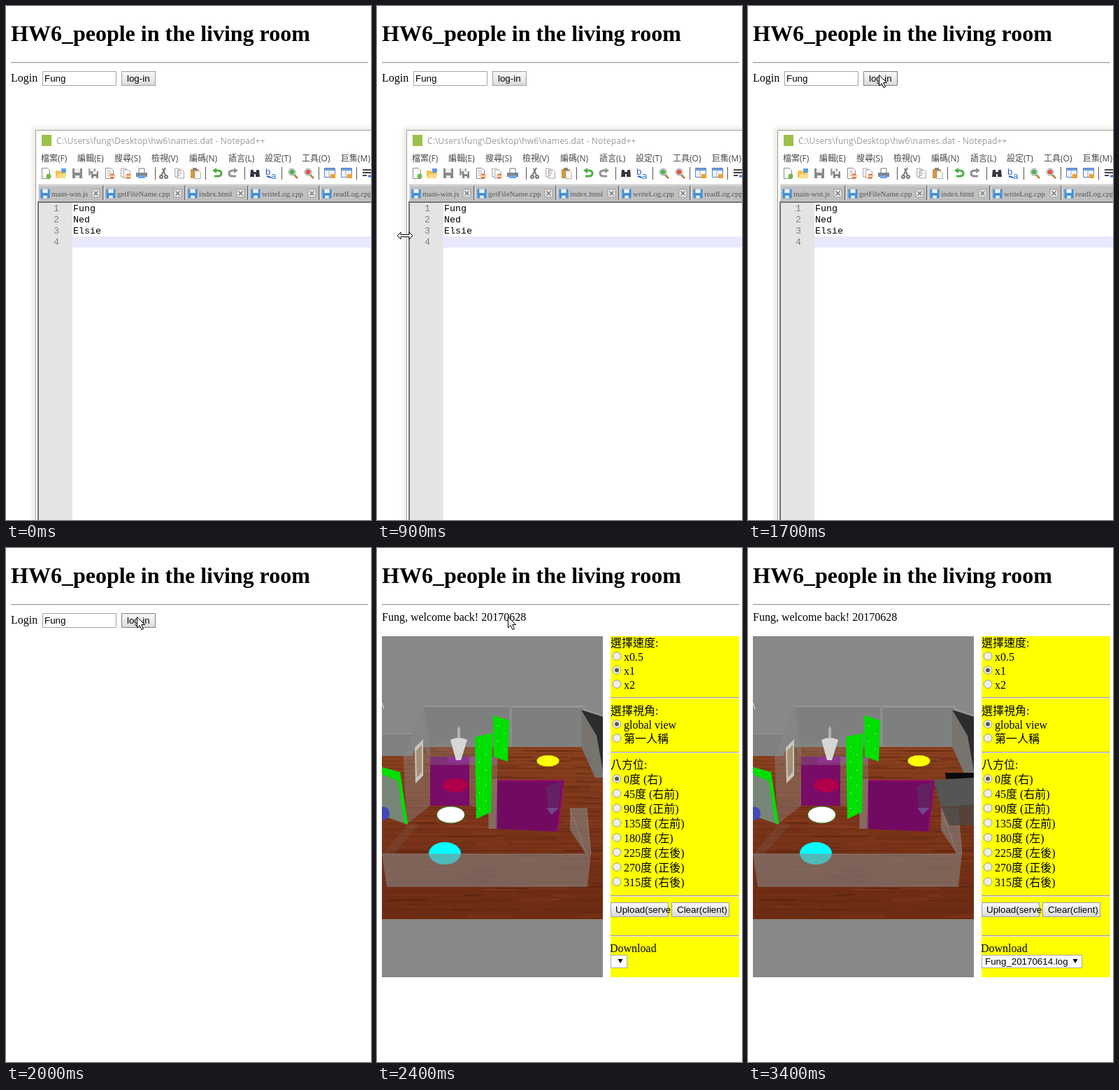
These frames come from a looping animation (522x734 px, 4 s). An HTML page:

```html
<!DOCTYPE html>
<html lang="zh-Hant">
<head>
<meta charset="utf-8">
<title>People in the living room</title>
<style>
html, body { margin: 0; width: 100%; height: 100%; overflow: hidden; background: #fff; }
svg { display: block; }
text { white-space: pre; }
.serif { font: 16px "Liberation Serif", "Noto Sans CJK TC", serif; }
.h1 { font: bold 32px "Liberation Serif", serif; }
.ui { font: 13.333px "Liberation Sans", sans-serif; }
.bar { font: 12px "Open Sans", "Noto Sans", sans-serif; letter-spacing: .15px; fill: #999; }
.menu { font: 12px "Open Sans", "Noto Sans CJK TC", sans-serif; fill: #444; }
.tab { font: 11px "Liberation Serif", serif; fill: #555; }
.code { font: 13.333px "Liberation Mono", monospace; }
.line { fill: none; stroke: #555; }
</style>
</head>
<body>
<svg width="522" height="734" viewBox="0 0 522 734">
  <defs>
    <linearGradient id="btn" x2="0" y2="1">
      <stop offset="0" stop-color="#f6f6f6"/><stop offset=".5" stop-color="#ececec"/><stop offset="1" stop-color="#d8d8d8"/>
    </linearGradient>
    <linearGradient id="wood" x2="0" y2="1">
      <stop offset="0" stop-color="#8a421f"/><stop offset=".4" stop-color="#7c3519"/><stop offset="1" stop-color="#6c2b13"/>
    </linearGradient>
    <filter id="blur"><feGaussianBlur stdDeviation="3"/></filter>
    <clipPath id="view"><path d="M7 126H323V613H7Z"/></clipPath>
    <clipPath id="floorClip"><path d="M7 297H50L56 284H293L323 328V530H7Z"/></clipPath>
    <clipPath id="upClip"><path d="M334 500H420.5V530H334Z"/></clipPath>
    <path id="page" d="M-5.5-7.5H2L5.5-4V7.5H-5.5Z" fill="#fff" stroke="#8a8a8a"/>
    <g id="disk"><path d="M-7-7H7V7H-7Z"/><path d="M-4-7H4V-1H-4Z M-3 3H3V7H-3Z" fill="#eee"/></g>
    <g id="glassIcon"><path d="M2 2L7 7" stroke="#b58b4a" stroke-width="3"/><circle cx="-1" cy="-2" r="5" fill="#dcebf5" stroke="#8fa4b5"/></g>
    <g id="win"><path d="M-7.5-7.5H7.5V5.5H-7.5Z" fill="#eef4fc" stroke="#5b83bd"/><path d="M-7-7H7V-4H-7Z" fill="#6f9bd8"/><path d="M-1-4V5" stroke="#9ab6dc"/><path d="M1 1H8V7H1Z" fill="#f0a030"/></g>
  </defs>

  <text class="h1" x="7" y="50">HW6_people in the living room</text>
  <path d="M7 80.5H518" stroke="#9a9a9a"/><path d="M7 81.5H518" stroke="#e4e4e4"/>

  <g id="login">
    <text class="serif" x="7" y="108">Login</text>
    <path d="M52.5 93.5H157.5V113.5H52.5Z" fill="#fff" stroke="#a4a4a4"/>
    <text class="ui" x="55" y="108">Fung</text>
    <path id="loginBtn" d="M165.5 93.5H213.5V113.5H165.5Z" fill="url(#btn)" stroke="#a0a0a0"/>
    <text class="ui" x="173" y="108">log-in</text>
  </g>

  <g id="editor">
    <path d="M38 174H540V750H38Z" fill="#d8d8cc" opacity=".6" filter="url(#blur)"/>
    <path d="M42.5 177.5H530V740H42.5Z" fill="#fff" stroke="#a0a0a0"/>
    <path d="M51 184H65V200H51Z" fill="#9cc04a"/>
    <text class="bar" x="72" y="197">C:\Users\fung\Desktop\hw6\names.dat - Notepad++</text>
    <g id="menu"></g>
    <g id="tools"></g>
    <path d="M46 255H522V280H46Z" fill="#b4b4b4"/>
    <g id="tabs"></g>
    <path d="M46 278H522V279H46Z" fill="#d8d8d8"/>
    <path d="M45 279H522V281H47V734H45Z" fill="#707070"/>
    <path d="M47 281H95V734H47Z" fill="#e4e4e4"/>
    <path d="M95 329H522V345H95Z" fill="#e8e8ff"/>
    <g id="code"></g>
  </g>

  <g id="home">
    <text class="serif" x="7" y="104">Fung, welcome back! 20170628</text>
    <g clip-path="url(#view)">
      <path d="M7 126H323V613H7Z" fill="#888"/>
      <path d="M7 297H50L56 284H293L323 328V530H7Z" fill="url(#wood)"/>
      <g id="planks" clip-path="url(#floorClip)"></g>
      <path d="M7 221L10 230" stroke="#eee"/>
      <path d="M7 265H62L50 297H7Z" fill="#808080"/><path d="M7 265.5H62" stroke="#969696"/>
      <path d="M67 226H189V283H56L38 300Z" fill="#7e8080"/>
      <path d="M193 226H293V283H193Z" fill="#7e8080"/>
      <path d="M67 225H189V227H66Z M193 225H296L298 228H193Z" fill="#959595"/>
      <path d="M189 225H193V284H189Z" fill="#8c8c8c"/>
      <path d="M292 231L296 228 323 238V328H312L292 284Z" fill="#77736f"/>
      <path d="M292 231L323 240V318L314 268Z" fill="#2c2c2c"/>
      <path d="M296 228L323 238V241L292 231Z" fill="#949494"/>
      <path d="M67 226L38 300 42 395 76 368V285Z" fill="#8c8c8c" opacity=".4"/>
      <path d="M54 285L66 273V325L55 336Z" fill="#cbc5bc"/>
      <path d="M56 290L64 281V320L57 328Z" fill="#a39078"/>
      <path d="M76 298H132V368H76Z" fill="#780c68"/>
      <path d="M67 284L132 270H172V310H76V298Z" fill="#8c8c8c" opacity=".3"/>
      <path d="M100 298H170V307H100Z" fill="#9a35a5" opacity=".6"/>
      <path d="M132 298H172V332L170 401H160V372L132 368Z" fill="#8c8c8c" opacity=".35"/>
      <path d="M172 332H267L258 405 170 401Z" fill="#730a62"/>
      <path d="M172 332H267L258 405" fill="none" stroke="#960f66" stroke-width="2"/>
      <path d="M241 341L264 333 259 374 246 380Z" fill="#642065"/>
      <path d="M242 371H260L250 381Z" fill="#70458c"/>
      <path d="M159 330H172V401H159Z" fill="#8c8c8c" opacity=".4"/>
      <path d="M166 239L189 246 187 305 167 298Z" fill="#00df00"/>
      <path d="M140 270L165 264 163 377 142 387Z" fill="#00df00"/>
      <g id="holes"></g>
      <path d="M115 271V258L117 254 119 258V271Z" fill="#b4b0ac"/>
      <path d="M105 274Q117 268 129 274L120 303H113Z" fill="#d8d6d4"/>
      <ellipse cx="244.500" cy="304" rx="16" ry="8" fill="#ffff00"/>
      <ellipse cx="112" cy="339" rx="18" ry="10" fill="#b0004a"/>
      <ellipse cx="105.500" cy="381" rx="20" ry="12" fill="#fff" stroke="#28701c"/>
      <path d="M7 313L33 320 44 395 7 382Z" fill="#788678"/>
      <path d="M7 313L33 320 44 394 39 393 30 333 7 323Z" fill="#00df00"/>
      <ellipse cx="9" cy="379" rx="9" ry="9.500" fill="#4248b8"/>
      <ellipse cx="97" cy="436" rx="23" ry="16" fill="#00ffff"/>
      <path d="M44 395L7 437H24L60 395Z" fill="#888" opacity=".15"/>
      <path d="M7 437H299L301 484H14Z" fill="#888" opacity=".58"/>
      <path d="M276 372H300L306 436 301 484 299 437 276 403Z" fill="#888" opacity=".58"/>
      <path d="M7 437H299L276 372H300L306 436" fill="none" stroke="#999" opacity=".5"/>
      <g id="late">
        <path d="M282 321H323V332L283 330Z" fill="#0b0b0b"/>
        <path d="M266 331L323 328V367L276 370Z" fill="#555"/>
        <path d="M276 370L323 366V396H288Z" fill="#4a4644" opacity=".8"/>
      </g>
    </g>
    <path d="M334 126H518V613H334Z" fill="#ff0"/>
    <g id="form"></g>
    <path d="M334.500 506.500H416.500V526.500H334.500Z M421.500 506.500H503.500V526.500H421.500Z" fill="url(#btn)" stroke="#a0a0a0"/>
    <text class="ui" x="341" y="521" clip-path="url(#upClip)">Upload(server)</text>
    <text class="ui" x="429" y="521">Clear(client)</text>
    <text class="serif" x="333" y="577">Download</text>
    <rect id="box" x="334.500" y="581.500" height="18" fill="#fff" stroke="#a9a9a9"/>
    <text id="file" class="ui" x="339" y="595">Fung_20170614.log</text>
    <path id="drop" d="M-3.500 587H3.500L0 593Z"/>
  </g>

  <g id="cursor" stroke="#000" fill="#fff">
    <path id="arrow" d="M.5.5V16L4 12.500 7 18.500 9.500 17.500 6.700 11.500H11.500Z"/>
    <path id="ibeam" d="M-4-7.500H-1Q0-7.500 0-6V6Q0 7.500-1 7.500H-4M4-7.500H1Q0-7.500 0-6V6Q0 7.500 1 7.500H4" fill="none"/>
    <path id="resize" d="M-11 0L-6-5V-1.500H6V-5L11 0 6 5V1.500H-6V5Z"/>
  </g>
</svg>
<script>
const LOOP = 4000;
const $ = id => document.getElementById(id);
const add = (id, markup) => { $(id).innerHTML += markup; };
const label = (cls, x, y, str, extra = '') =>
  `<text class="${cls}" x="${x}" y="${y}" ${extra}>${str}</text>`;

// Editor chrome
const menus = { 50: '檔案(F)', 102: '編輯(E)', 155: '搜尋(S)', 208: '檢視(V)', 262: '編碼(N)',
  318: '語言(L)', 370: '設定(T)', 423: '工具(O)', 479: '巨集(M)' };
add('menu', Object.entries(menus).map(([x, s]) => label('menu', x, 222, s)).join(''));

const use = (id, attrs = '') => `<use href="#${id}" ${attrs}/>`;
const dot = (x, y, color) => `<circle cx="${x}" cy="${y}" r="3.5" fill="${color}"/>`;
const minus = '<path d="M1 4H7" stroke="#fff" stroke-width="1.5"/>';
const sheets = use('page', 'transform="translate(-2 -1) scale(.8)"') + use('page', 'transform="translate(2 1) scale(.8)"');
const rows = '<path d="M-3-3H2M-3 0H3M-3 3H1" stroke="#999"/>';
const swoop = color => `<path d="M-5-4H1Q6-4 6 0T1 4H-4" fill="none" stroke="${color}" stroke-width="3"/><path d="M-1-8V0L-7-4Z" fill="${color}"/>`;
const tools = {
  57: use('page') + dot(4, 4, '#6cba4c'),
  79: '<path d="M-8-4H-2L0-2H6V7H-8Z" fill="#f3c14e"/><path d="M-8 7L-4 1H8L5 7Z" fill="#fbdc86"/><path d="M0-7H7V-1H0Z" fill="#5c9be0"/>',
  102: use('disk', 'fill="#8a8a8a"'),
  125: use('disk', 'fill="#999" transform="translate(-2 -2) scale(.7)"') + use('disk', 'fill="#808080" transform="translate(2 2) scale(.7)"'),
  148: use('page') + rows + dot(4, 4, '#ee7733') + minus,
  171: sheets + dot(4, 4, '#ee7733') + minus,
  194: '<path d="M-4-7H4V0H-4Z" fill="#fff" stroke="#777"/><path d="M-8-1H8V5H-8Z" fill="#7d8794"/><path d="M-5 3H5V7H-5Z" fill="#6fa8ea"/>',
  225: '<path d="M-3 3L3-8M3 3L-1-7" stroke="#777" stroke-width="2"/><g fill="none" stroke="#777" stroke-width="2"><circle cx="-3" cy="5" r="2"/><circle cx="4" cy="5" r="2"/></g>',
  248: sheets + rows,
  271: '<path d="M-7-6H5V7H-7Z" fill="#d9963c"/><path d="M-4-8H2V-4H-4Z" fill="#888"/>' + use('page', 'transform="translate(3 2) scale(.75)"'),
  302: swoop('#4fae46'),
  325: `<g transform="scale(-1 1)">${swoop('#929292')}</g>`,
  356: '<path d="M-6-5H-2V-2H2V-5H6L7 5H1V1H-1V5H-7Z" fill="#33363f"/>',
  379: label('ui', -8, 2, 'b', 'fill="#2b62c0" font-weight="bold"') + label('ui', 0, 8, 'a', 'fill="#2b7fd0" font-weight="bold"') + '<path d="M-6 4L0 6" stroke="#2b62c0" stroke-width="2"/>',
  410: use('glassIcon') + dot(-1, -2, '#55b044'),
  433: use('glassIcon') + dot(-1, -2, '#e05548'),
  463: use('win'), 487: use('win'),
  516: '<path d="M-6-5H6M-6-1H6M-6 3H0" stroke="#444" stroke-width="2"/><path d="M2 4H8" stroke="#4a80dd" stroke-width="3"/>'
};
add('tools', Object.entries(tools).map(([x, art]) => `<g transform="translate(${x} 239)">${art}</g>`).join('') +
  [213, 285, 341, 394, 447, 501].map(x => `<path class="line" d="M${x}.5 230V248"/>`).join(''));

const tabs = [[46, 139, 'main-win.js'], [140, 256, 'getFileName.cpp'], [257, 346, 'index.html'],
  [347, 448, 'writeLog.cpp'], [449, 560, 'readLog.cpp']];
add('tabs', tabs.map(([l, r, name]) => `
  <path d="M${l} 257H${r - 1}V277H${l}Z" fill="#c0c0c0"/>
  <path d="M${l}.5 277V256.5H${r - 1}" fill="none" stroke="#e6e6e6"/>
  <path d="M${r - 1}.5 257V277" stroke="#666"/>
  <use href="#disk" fill="#3f8fdd" transform="translate(${l + 10} 268) scale(.93)"/>
  ${label('tab', l + 19, 272, name)}
  <path d="M${r - 16} 262H${r - 5}V273H${r - 16}Z" fill="#e9e9e9" stroke="#999"/>
  <path d="M${r - 13.5} 264.5l6 6m0-6l-6 6" stroke="#777" stroke-width="1.6"/>`).join(''));

add('code', ['Fung', 'Ned', 'Elsie', ''].map((s, i) =>
  label('code', 68, 293 + 16 * i, i + 1, 'fill="#808080"') + label('code', 96, 293 + 16 * i, s)).join(''));

// Room details
let seed = 7;
const rand = () => (seed = seed * 16807 % 2147483647) / 2147483647;
let planks = '';
for (let y = 286, gap = 4; y < 530; y += gap, gap += .35) {
  planks += `<path d="M7 ${y}H323" stroke="#30100a" opacity=".2"/>`;
  for (let n = 0; n < 6; n++) {
    const x = 7 + rand() * 300, w = 20 + rand() * 60;
    planks += `<path d="M${x} ${y + rand() * gap}h${w}" stroke="${rand() < .5 ? '#3c150b' : '#a04a22'}" stroke-width="${1 + rand() * 2}" opacity=".25"/>`;
  }
}
add('planks', planks);
let holes = '';
for (let i = 0; i < 9; i++) {
  holes += `<path d="M${146 + i % 2 * 9} ${284 + i * 11}h1.500" stroke="#cfc"/>`;
  if (i < 4) holes += `<path d="M${172 + i % 2 * 9} ${254 + i * 11}h1.500" stroke="#cfc"/>`;
}
add('holes', holes);

// Options panel
const radio = (y, str, on) => `
  <circle cx="343" cy="${y - 6.5}" r="5.800" fill="#eee" stroke="#999"/>
  ${on ? `<circle cx="343" cy="${y - 6.5}" r="3" fill="#555"/>` : ''}
  ${label('serif', 353, y, str)}`;
const group = (y, title, step, pick, items) =>
  add('form', label('serif', 334, y, title) +
    items.map((s, i) => radio(y + step * (i + 1), s, i === pick)).join(''));
group(141, '選擇速度:', 20, 1, ['x0.5', 'x1', 'x2']);
group(238, '選擇視角:', 20, 0, ['global view', '第一人稱']);
group(315, '八方位:', 21, 0, ['0度 (右)', '45度 (右前)', '90度 (正前)', '135度 (左前)',
  '180度 (左)', '225度 (左後)', '270度 (正後)', '315度 (右後)']);
add('form', [213, 291, 496, 553].map(y =>
  `<path d="M334 ${y}.5H518" stroke="#9a9a9a"/><path d="M334 ${y + 1}.5H518" stroke="#eee"/>`).join(''));

// Pointer: start time, shape, x, y, horizontal flip
const moves = [
  [0, ''], [200, 'arrow', 470, 111], [300, 'arrow', 398, 236], [400, 'ibeam', 310, 372],
  [500, 'ibeam', 250, 408], [600, 'ibeam', 203, 370], [700, 'arrow', 84, 325, -1],
  [800, 'resize', 42, 329], [900, 'resize', 40, 328], [1000, 'ibeam', 112, 322],
  [1100, 'ibeam', 172, 312], [1200, 'arrow', 152, 200], [1300, 'arrow', 133, 126],
  [1400, 'arrow', 152, 118], [1500, 'arrow', 174, 106], [1600, 'arrow', 184, 100],
  [1700, 'arrow', 187, 98], [3100, 'arrow', 222, 82], [3200, 'arrow', 410, 53],
  [3300, 'arrow', 501, 43], [3400, '']
];
const show = (id, on) => { $(id).style.display = on ? '' : 'none'; };

function draw(t) {
  const [, shape, x = 0, y = 0, flip = 1] = moves.filter(m => m[0] <= t).pop();
  ['arrow', 'ibeam', 'resize'].forEach(id => show(id, id === shape));
  $('cursor').setAttribute('transform', `translate(${x} ${y}) scale(${flip} 1)`);
  const loaded = t >= 3200;
  show('editor', t < 2000);
  show('login', t < 2400);
  show('home', t >= 2400);
  show('late', loaded);
  show('file', loaded);
  $('loginBtn').setAttribute('stroke', t >= 1500 ? '#808080' : '#a0a0a0');
  $('box').setAttribute('width', loaded ? 143 : 23);
  $('drop').setAttribute('transform', `translate(${loaded ? 468 : 348} 0)`);
}

const start = performance.now();
function tick() {
  draw((performance.now() - start) % LOOP);
  requestAnimationFrame(tick);
}
tick();
</script>
</body>
</html>
```
